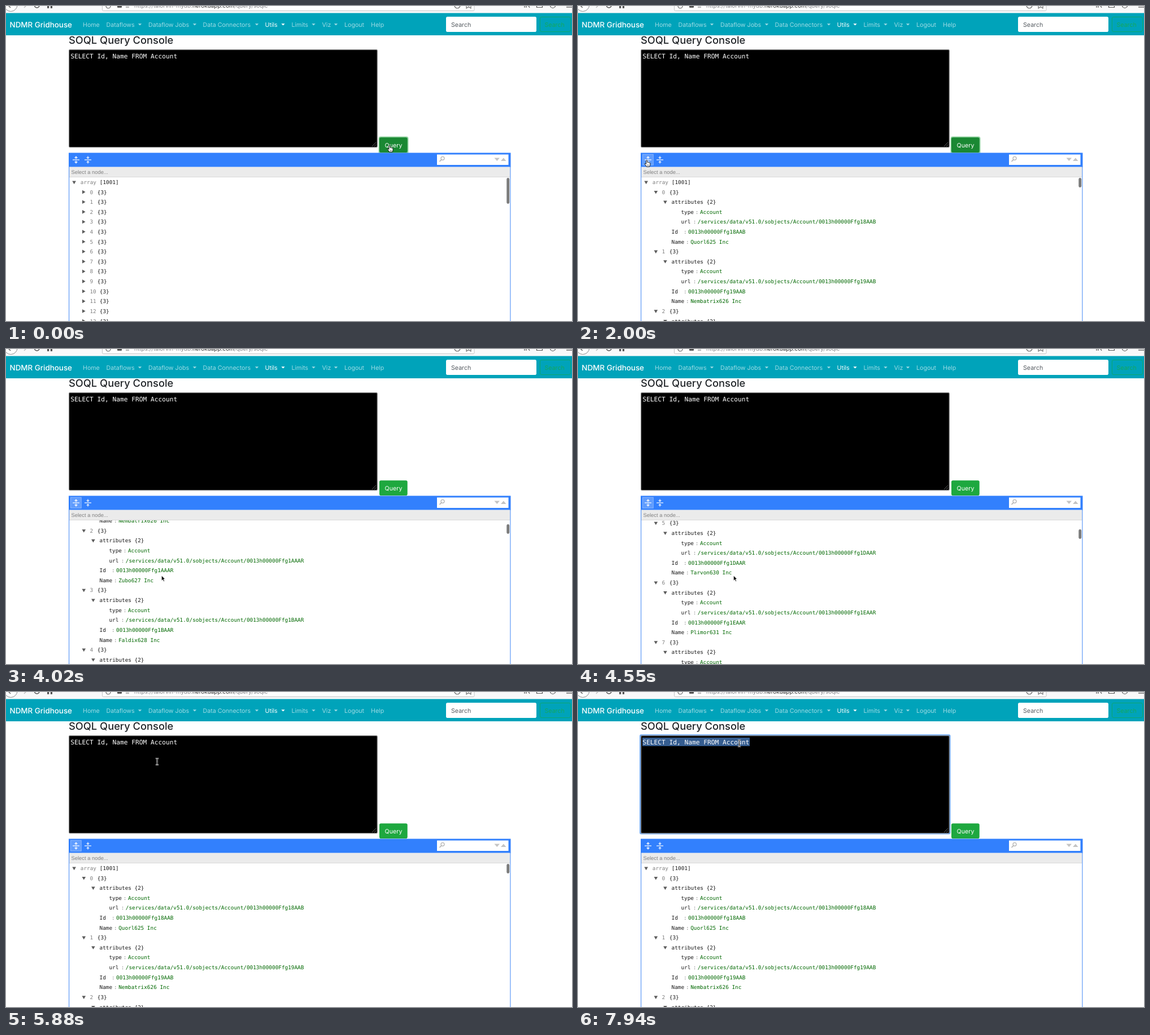
Recreate the animation shown at these times as an HTML page. Size 1002 px wide and 559 px high, loop 8000 ms.

```html
<!DOCTYPE html>
<html lang="en">
<head>
<meta charset="utf-8">
<title>SOQL Query Console</title>
<style>
  html, body { margin: 0; width: 100%; height: 100%; overflow: hidden; background: #fff; }
  svg { display: block; width: 100vw; height: 100vh; }
  text { text-rendering: geometricPrecision; white-space: pre; }
  .ui { font: 10.65px Inter, sans-serif; }
  .brand { font: 500 13.4px Inter, sans-serif; }
  .title { font: 500 18.3px Inter, sans-serif; }
  .code { font: 11.23px "DejaVu Sans Mono", monospace; }
  .tree { font: 9.37px "DejaVu Sans Mono", monospace; }
  .path { font: 9.37px "Liberation Sans", Arial, sans-serif; }
  .url { font: 10px Inter, sans-serif; }
</style>
</head>
<body>
<svg id="stage" viewBox="0 0 1002 559" preserveAspectRatio="none"></svg>
<script>
const LOOP = 8000, ROW = 17.615, CH = 5.641, TOP = 312.5;
const INK = '#1a1a1a', GRAY = '#808080', GREEN = '#006800';

const text = (x, y, s, cls, fill, more = '') =>
  `<text x="${x}" y="${y}" class="${cls}" fill="${fill}" ${more}>${s}</text>`;
const rect = (x, y, w, h, fill, more = '') =>
  `<rect x="${x}" y="${y}" width="${w}" height="${h}" fill="${fill}" ${more}/>`;
const shape = (d, fill, more = '') => `<path d="${d}" fill="${fill}" ${more}/>`;
const line = (d, color, w = 1, more = '') =>
  shape(d, 'none', `stroke="${color}" stroke-width="${w}" ${more}`);

function browserBar() {
  return rect(0, 0, 1002, 13, '#f9f9fa') +
    `<circle cx="8.5" cy="-2" r="11.5" fill="#fff" stroke="#8b8b8e"/>` +
    line('M4 -1L8 3', '#555', 1.3) + line('M32 3L36 -1', '#bbb', 1.3) +
    line('M50.500 0A4.500 4.500 0 0 0 59 0', '#555', 1.3) +
    shape('M73 -2h9v6h-3.200v-4h-2.600v4h-3.200z', '#555') +
    rect(170.5, -20, 658.5, 28.5, '#fff', 'rx="2" stroke="#c4c4c6"') +
    line('M177 0A4 4 0 0 0 185 0', '#666', 1.2) + rect(197, -3, 8, 6, '#555', 'rx="1"') +
    line('M212 -.500H222M212 2H218', '#666', 1.1) +
    text(227, 3, 'https://talorvin-mydb.<tspan fill="#333">herokuapp.com</tspan>/query/soqlc', 'url', '#86868a') +
    line('M794 -1A5 5 0 0 0 804 -1', '#666', 1.2) +
    line('M815 -1V4L819 1.500L823 4V-1', '#666', 1.1) +
    line('M918 -2V3M921 -2V3M924 -2L927 3', '#555', 1.2) +
    line('M939.500 -3V2.500H949.500V-3', '#555', 1.2) +
    line('M963.500 -1A4.500 4.500 0 0 0 972.500 -1', '#555', 1.2) +
    line('M992 2H1002', '#555', 1.3);
}

function navBar() {
  const items = [['Home', 136], ['Dataflows', 177.5, 237], ['Dataflow Jobs', 252, 334],
    ['Data Connectors', 348.5, 444], ['Utils', 458.5, 490.5], ['Limits', 505.5, 544.5],
    ['Viz', 559.5, 584], ['Logout', 599, 0], ['Help', 646]];
  const soft = 'rgba(255,255,255,.62)';
  return rect(0, 12.5, 1002, 39.5, '#00a3ba') +
    text(6.5, 37.6, 'NDMR Gridhouse', 'brand', '#fff') +
    items.map(([s, x, caret]) => {
      const on = s === 'Utils', color = on ? '#fff' : soft;
      return text(x, 36.6, s, 'ui', color, on ? 'font-weight="500"' : '') +
        (caret ? shape(`M${caret - 3.2} 31.300h6.400l-3.200 3.300z`, color) : '');
    }).join('') +
    rect(779, 19, 160, 27, '#fff', 'rx="2.800"') +
    text(788, 36.6, 'Search', 'ui', '#555b61') +
    rect(945.5, 19.5, 54, 26, 'none', 'rx="2.800" stroke="#14a85c" stroke-width=".8"') +
    text(953.5, 36.6, 'Search', 'ui', '#14a85c');
}

function queryForm() {
  return text(111, 67.2, 'SOQL Query Console', 'title', '#212529') +
    rect(109, 75.2, 550.5, 177.3, '#70a8f0', 'rx="3" id="ring"') +
    rect(111.6, 77.6, 545.6, 173, '#000', 'rx="1.500" stroke="#808080" stroke-width="1.200"') +
    line('M648 249L655 242M652 249L655 246', '#777', .8) +
    rect(256, 81, 48, 15, '#355d90', 'id="pick"') +
    text(114.2, 92.6, 'SELECT Id, Name FROM Account', 'code', '#fff') +
    rect(659.5, 231.5, 53, 31, '#93d3a2', 'rx="4" id="halo"') +
    rect(661, 233.3, 49.7, 26.7, '#1ea83f', 'rx="2.800" id="run"') +
    text(686, 250.8, 'Query', 'ui', '#fff', 'text-anchor="middle"');
}

function toolBar() {
  const w = 'rgba(255,255,255,.85)';
  return rect(111, 260.5, 782.5, 25.2, '#3280fd') +
    rect(114.5, 263.3, 18.8, 19, 'rgba(255,255,255,.22)', 'stroke="rgba(255,255,255,.35)" id="hot"') +
    rect(118, 272.3, 12, 1.4, w) +
    shape('M124 266.300l3.200 3.400h-2.500v1.800h-1.400v-1.800h-2.500zM124 279.700l3.200 -3.400h-2.500v-1.800h-1.400v1.800h-2.500z', w) +
    rect(139, 272.3, 12, 1.4, w) +
    shape('M145 271.500l3 -3.100h-2.300v-1.900h-1.400v1.900h-2.300zM145 274.500l3 3.100h-2.300v1.900h-1.400v-1.900h-2.300z', w) +
    rect(763, 263.5, 126.5, 18.5, '#fff') +
    `<circle cx="773" cy="270.300" r="3" fill="none" stroke="#b5b5b5" stroke-width="1.300"/>` +
    line('M770.800 272.700L767.500 276', '#b5b5b5', 1.7) +
    shape('M864.500 269.500h9.500l-4.750 5.500zM876 275h9.500l-4.750 -5.500z', '#c4c4c4') +
    rect(112, 285.7, 780.5, 18, '#ebebeb') + line('M112 303.500H892', '#d3d3d3', .8) +
    text(115.6, 298, 'Select a node...', 'path', GRAY);
}

const tri = (x, y, open) => shape(open
  ? `M${x - 3.3} ${y - 2.2}h6.600l-3.300 5.600z`
  : `M${x - 2.8} ${y - 3.3}v6.600l5.600 -3.300z`, '#5c5c5c');
const word = (x, y, s, fill = INK) => text(x, y + 3.4, s, 'tree', fill);

function pair(x, y, key, value) {
  const vx = x + Math.max(29.4, key.length * CH + 11);
  return word(x, y, key) + word(vx - 8.1, y, ':', GRAY) + word(vx, y, value, GREEN);
}

function item(i, y, open) {
  return tri(137.8, y, open) + word(148.4, y, i, GRAY) + word(i < 10 ? 161.8 : 165.8, y, '{3}');
}

const rootRow = tri(120.6, TOP + .3, true) + word(131.8, TOP, 'array', GRAY) + word(165.8, TOP, '[1001]');

function closedTree() {
  let out = rootRow;
  for (let i = 0; i < 14; i++) out += item(i, TOP + (i + 1) * ROW, false);
  return out;
}

function openTree() {
  const names = ['Quorl', 'Nembatrix', 'Zubo', 'Faldix', 'Mirvo', 'Tarvon', 'Plimor', 'Bexal', 'Drenvik'];
  return rootRow + names.map((name, i) => {
    const y = n => TOP + (1 + i * 6 + n) * ROW;
    const id = '0013h00000Ffg1' + '89ABCDEFG'[i] + (i < 2 ? 'AAB' : 'AAR');
    return item(i, y(0), true) +
      tri(154.4, y(1), true) + word(165.6, y(1), 'attributes {2}') +
      pair(182.4, y(2), 'type', 'Account') +
      pair(182.4, y(3), 'url', '/services/data/v51.0/sobjects/Account/' + id) +
      pair(165.6, y(4), 'Id', id) +
      pair(165.6, y(5), 'Name', `${name}${625 + i} Inc`);
  }).join('');
}

// Pointers, each with its hot spot at 0,0
const beam = 'M-2.600 -5.600Q0 -5.600 0 -4.200Q0 -5.600 2.600 -5.600M0 -4.500V4.500M-2.600 5.600Q0 5.600 0 4.200Q0 5.600 2.600 5.600M-1.300 1.800H1.300';
const pointers = {
  arrow: shape('M0 0V9.200L2.200 7.200L3.700 10.600L5.300 9.900L3.800 6.600H6.600Z', '#000', 'stroke="#fff" stroke-width=".8"'),
  beam: line(beam, '#fff', 2.2) + line(beam, '#222', 1),
  hand: shape('M-1.100 .800Q0 -.600 1.100 .800V4Q2.300 3.200 3 4.300Q4.200 3.700 4.700 4.800Q6.300 4.500 6.200 6.200Q6.200 9 5 11.600H-.500Q-1.600 9.400 -3.400 7.200Q-3.600 5.600 -2.300 6L-1.100 7Z',
    '#fff', 'stroke="#000" stroke-width=".9" stroke-linejoin="round"') + line('M1.200 8V10M3.200 8V10', '#000', .7)
};

const stage = document.getElementById('stage');
stage.innerHTML = `<defs><clipPath id="pane"><rect x="112" y="304" width="780" height="255"/></clipPath></defs>` +
  rect(0, 0, 1002, 559, '#fff') + browserBar() + navBar() + queryForm() + toolBar() +
  `<g clip-path="url(#pane)"><g id="closed">${closedTree()}</g><g id="open">${openTree()}</g></g>` +
  line('M111.600 285V559M892.900 285V559', '#3f86f5') +
  rect(886.3, 305, 4.9, 46, '#7b7b7b', 'rx="2.400" id="thumb"') +
  Object.entries(pointers).map(([k, v]) => `<g id="${k}">${v}</g>`).join('');

// Moves: start, end, steps, goal, ease-out power
const moves = [
  [170, 290, 2, [389, 119]], [470, 640, 3, [288, 214], 1.5],
  [820, 1350, 7, [123, 285], 1.4], [1430, 1520, 2, [121.7, 273.5]],
  [3020, 3190, 3, [276, 402.7], 1.5], [3750, 3750, 1, [275.3, 402]],
  [5790, 5790, 1, [272, 290]], [5880, 5880, 1, [267.5, 123.5]], [5970, 5970, 1, [270, 59]],
  [6180, 6610, 6, [263, 97], 1.3], [6780, 6960, 3, [294, 90.5]], [7050, 7140, 2, [285.5, 91]]
];
const scrolls = [[3460, 3750, 4, [84]], [4020, 4550, 6, [549.6], 1.88], [5290, 5640, 4, [0], 1.5]];
const fades = [[470, 640, 3, [0]], [2000, 2000, 1, [1]], [2480, 2660, 3, [0]],
  [3550, 3550, 1, [1]], [6430, 6610, 3, [0]]];
const kinds = [[0, 'hand'], [170, 'beam'], [1080, 'arrow'], [1430, 'hand'], [3020, 'arrow'],
  [3190, 'beam'], [3750, 'arrow'], [5880, 'beam']];

function follow(track, from, t) {
  let now = from;
  for (const [a, b, n, goal, power = 1] of track) {
    if (t < a) break;
    const done = b > a ? Math.min(n, 1 + Math.floor((t - a) / (b - a) * (n - 1) + 1e-6)) : n;
    const p = 1 - (1 - done / n) ** power;
    now = now.map((v, i) => v + (goal[i] - v) * p);
  }
  return now;
}

const el = id => document.getElementById(id);
const set = (id, attrs) => { for (const k in attrs) el(id).setAttribute(k, attrs[k]); };
const show = (id, on) => set(id, { visibility: on ? 'visible' : 'hidden' });

function draw(t) {
  const [x, y] = follow(moves, [679, 247.5], t);
  const [scroll] = follow(scrolls, [0], t);
  const [alpha] = follow(fades, [1], t);
  const kind = kinds.filter(k => k[0] <= t).pop()[1];
  const opened = t >= 2000, focused = t < 2090;
  for (const k in pointers) {
    show(k, k === kind);
    set(k, { transform: `translate(${x} ${y})` });
  }
  show('closed', !opened);
  show('open', opened);
  set('open', { transform: `translate(0 ${-scroll})` });
  set('thumb', { y: 305 + scroll * .0273, height: opened ? 17 : 46, opacity: alpha });
  show('halo', focused);
  set('run', { fill: focused ? '#1a8833' : '#1ea83f' });
  show('hot', t >= 1430 && t < 7590);
  show('ring', t >= 7590);
  show('pick', t >= 7760);
  set('pick', t >= 7940 ? { x: 114, width: 190 } : { x: 256, width: 48 });
}

function tick() {
  draw(performance.now() % LOOP);
  requestAnimationFrame(tick);
}
tick();
</script>
</body>
</html>
```
